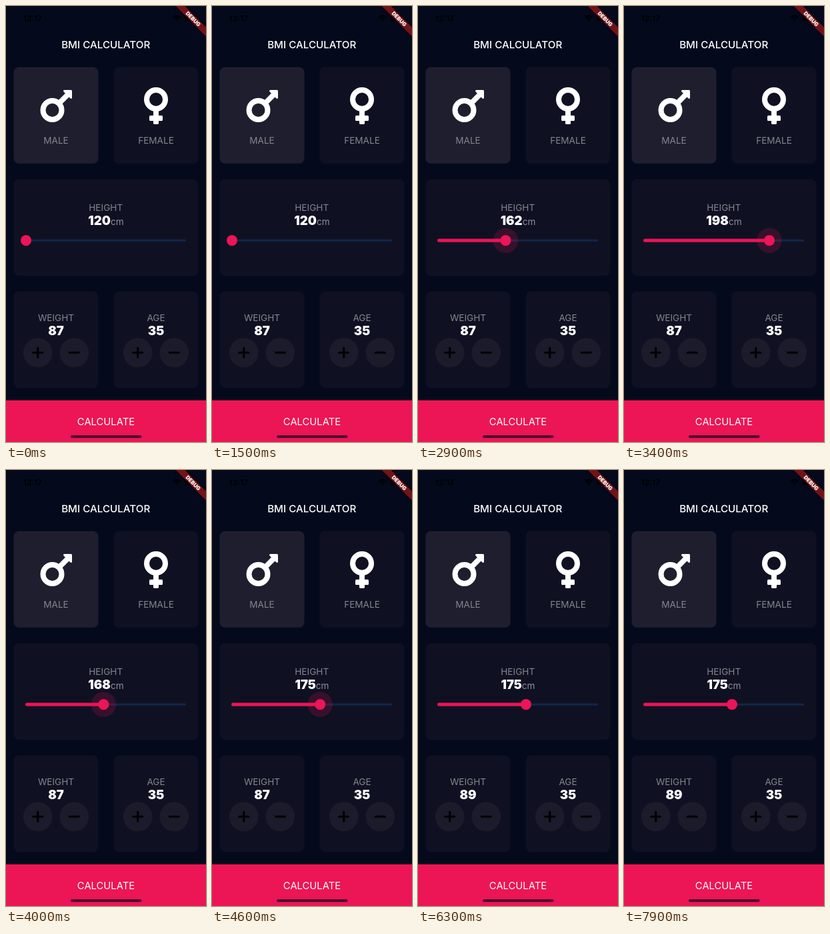
Write an HTML page that moves like this. It is 300x649 px and loops after 8000 ms.

```html
<!DOCTYPE html>
<html lang="en">
<head>
<meta charset="utf-8">
<title>BMI Calculator</title>
<style>
  html, body { margin: 0; width: 100%; height: 100%; overflow: hidden; background: #040a1c; }
  svg { display: block; width: 300px; height: 649px; font: 400 13.6px Inter, sans-serif; }
  text { text-anchor: middle; fill: #8d8e98; }
  .label { fill: #84858c; }
  .number { font-size: 18.6px; font-weight: 900; fill: #fff; }
  .white { fill: #fff; }
  .card { fill: #0f1123; }
  .active { fill: #1e1e2f; }
  .button { fill: #1b1b2b; }
  .pink { fill: #ec1556; }
  .sign { stroke: #000; stroke-width: 3; stroke-linecap: round; }
</style>
</head>
<body>
<svg viewBox="0 0 300 649">
  <defs>
    <g id="minus"><circle class="button" r="21.8"/><path class="sign" d="M-7 0H7"/></g>
    <g id="plus"><use href="#minus"/><path class="sign" d="M0-7V7"/></g>
    <filter id="blur" x="-20%" y="-80%" width="140%" height="260%"><feGaussianBlur stdDeviation="2"/></filter>
  </defs>

  <!-- status bar -->
  <text x="40" y="23.3" font-size="12" font-weight="600" style="fill:#000">12:17</text>
  <g fill="none" stroke="#000" stroke-width="2">
    <path d="M250.5 17Q256 11.8 261.5 17M252.8 19.4Q256 16.4 259.2 19.4"/>
    <path d="M254.2 21L256 23L257.8 21Z" fill="#000" stroke="none"/>
    <rect x="268" y="14" width="17" height="8.5" rx="2.5" fill="#000" stroke="none"/>
  </g>
  <text class="white" x="149.7" y="63.2" font-size="15.2" font-weight="500">BMI CALCULATOR</text>

  <!-- gender -->
  <rect class="active" x="11.5" y="91" width="127" height="143.5" rx="8"/>
  <rect class="card" x="161.7" y="91" width="126.5" height="143.5" rx="8"/>
  <g fill="none" stroke="#fff" stroke-width="8">
    <circle cx="69.5" cy="155" r="14"/>
    <path d="M79 145.5L93 131.500"/>
    <path d="M87.500 126.500H97.500V136.500Z" fill="#fff" stroke-width="3" stroke-linejoin="round"/>
    <circle cx="225" cy="139" r="14"/>
    <path d="M225 154V174.500M217 167H233"/>
    <path d="M222.500 174.500H227.500M216.500 164.500V169.500M233.500 164.500V169.500" stroke-width="3" stroke-linecap="round"/>
  </g>
  <text class="label" x="75" y="204.500">MALE</text>
  <text class="label" x="225" y="204.500">FEMALE</text>

  <!-- height -->
  <rect class="card" x="11.5" y="258" width="276.700" height="143.500" rx="8"/>
  <text class="label" x="149.700" y="305.300">HEIGHT</text>
  <text x="150" y="326.300"><tspan class="number" id="height">120</tspan>cm</text>
  <rect x="30" y="347.400" width="240" height="3.200" rx="1.600" fill="#14264a"/>
  <rect class="pink" id="track" x="29" y="346.600" height="4.800" rx="2.400"/>
  <g id="thumb">
    <circle class="pink" id="halo" opacity=".18"/>
    <circle class="pink" r="8"/>
  </g>

  <!-- weight and age -->
  <rect class="card" x="11.500" y="425" width="126.700" height="143.500" rx="8"/>
  <rect class="card" x="161.700" y="425" width="126.500" height="143.500" rx="8"/>
  <text class="label" x="75" y="469">WEIGHT</text>
  <text class="label" x="225" y="469">AGE</text>
  <text class="number" id="weight" x="75" y="490">87</text>
  <text class="number" x="225" y="490">35</text>
  <use href="#plus" x="47.700" y="516"/>
  <use href="#minus" x="102.300" y="516"/>
  <use href="#plus" x="197.700" y="516"/>
  <use href="#minus" x="252.300" y="516"/>
  <circle id="splash" cx="47.700" cy="516" r="21.800" fill="#fff"/>

  <!-- footer -->
  <rect class="pink" y="587" width="300" height="62"/>
  <text class="white" x="150" y="623.500" font-size="14.800">CALCULATE</text>
  <rect x="97" y="639" width="106.500" height="4" rx="2" fill="#4b0f25"/>

  <g transform="translate(300) rotate(45)">
    <rect x="-32" y="22.400" width="64" height="9.600" opacity=".5" filter="url(#blur)"/>
    <rect x="-32" y="22.400" width="64" height="9.600" fill="#b71c1c" opacity=".63"/>
    <text class="white" y="30.100" font-size="8" font-weight="900">DEBUG</text>
  </g>
</svg>
<script>
  const LOOP = 8000;
  const $ = id => document.getElementById(id);
  const clamp = v => Math.max(0, Math.min(1, v));
  const ease = p => p * p * (3 - 2 * p);

  // thumb position: [time, x]
  const drag = [[2500, 30], [2900, 131.5], [3250, 218], [3400, 218],
                [4000, 146.4], [4200, 122], [4350, 122], [4600, 162.2], [4700, 162]];
  const taps = [5800, 6050];

  function thumbX(t) {
    const i = drag.findIndex(([time]) => time > t);
    if (i === 0) return drag[0][1];
    if (i < 0) return drag[drag.length - 1][1];
    const [t0, x0] = drag[i - 1], [t1, x1] = drag[i];
    return x0 + (x1 - x0) * ease((t - t0) / (t1 - t0));
  }

  function draw(t) {
    const x = thumbX(t);
    $('height').textContent = Math.round(120 + (x - 30) / 2.4);
    $('track').setAttribute('width', x - 29);
    $('thumb').setAttribute('transform', `translate(${x} 349)`);
    $('halo').setAttribute('r', 18.6 * clamp((t - 2450) / 100) * clamp((4980 - t) / 100));
    $('weight').textContent = 87 + taps.filter(tap => t >= tap + 50).length;
    const glow = taps.map(tap => clamp((t - tap + 50) / 50) * clamp((tap + 230 - t) / 150));
    $('splash').setAttribute('opacity', .1 * Math.max(...glow));
  }

  function tick() {
    draw(performance.now() % LOOP);
    requestAnimationFrame(tick);
  }
  tick();
</script>
</body>
</html>
```
